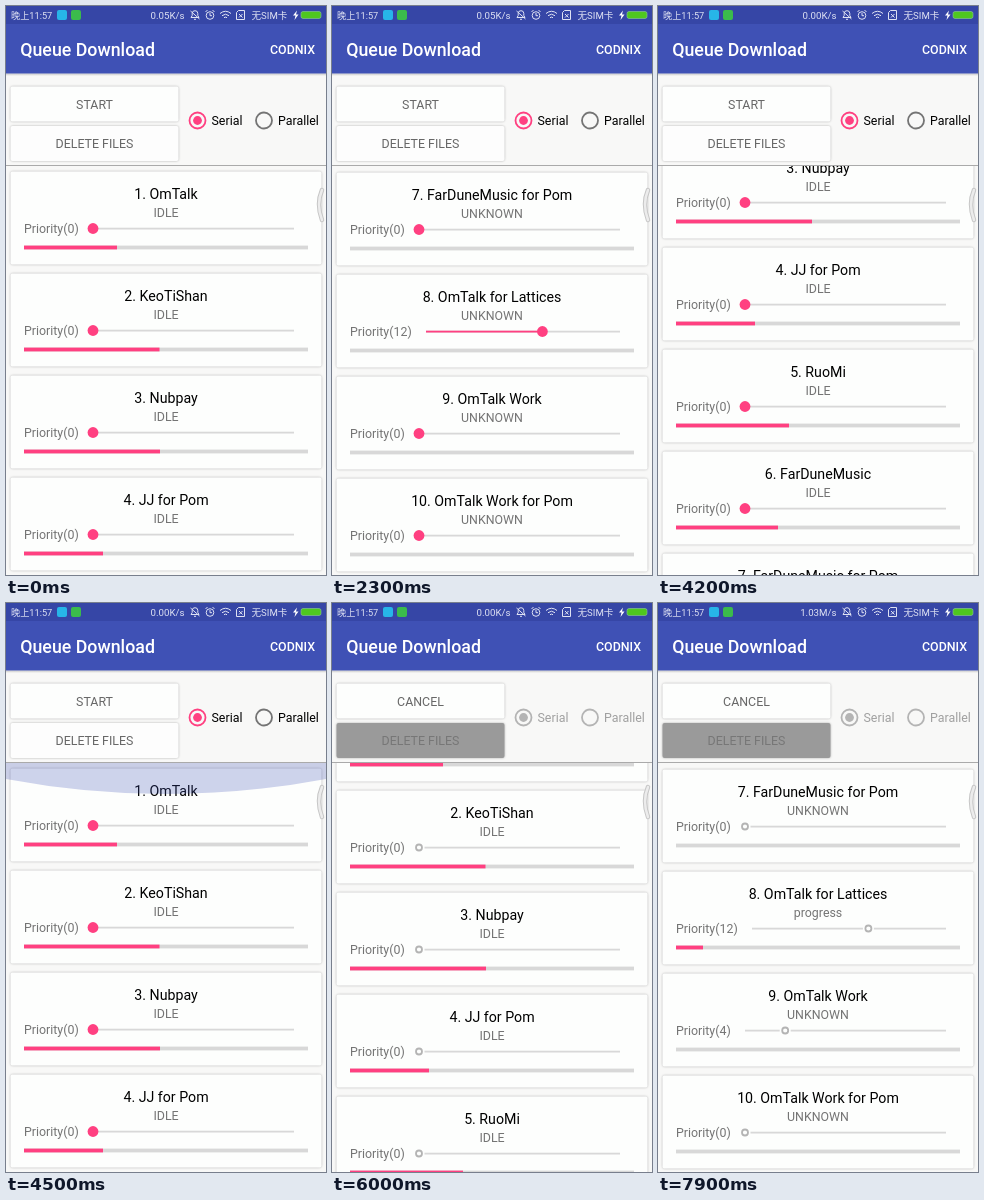
These frames come from a looping animation (320 px wide and 569 px high, 8 s). An HTML page:

```html
<!DOCTYPE html>
<html lang="en">
<head>
<meta charset="utf-8">
<title>Queue Download</title>
<style>
  html, body { margin: 0; width: 100%; height: 100%; overflow: hidden; background: #f8f8f7; }
  svg { display: block; width: 100vw; height: 100vh; font-family: Roboto, "Noto Sans CJK SC", "Noto Sans CJK", sans-serif; }
  .status { font-size: 9.2px; fill: #dfe2f3; }
  .label { font-size: 12.4px; }
  .name { font-size: 14.2px; }
  .raised { filter: drop-shadow(0 .7px .9px rgba(0, 0, 0, .28)); }
  .mid { text-anchor: middle; }
</style>
</head>
<body>
<svg viewBox="0 0 320 569">
  <defs>
    <clipPath id="listClip"><rect y="160" width="320" height="409"/></clipPath>
    <clipPath id="startClip"><rect x="4.5" y="80.5" width="168" height="35" rx="2"/></clipPath>
    <linearGradient id="barShadow" x2="0" y2="1">
      <stop stop-opacity=".2"/><stop offset="1" stop-opacity="0"/>
    </linearGradient>
  </defs>
  <rect width="320" height="569" fill="#f8f8f7"/>

  <g clip-path="url(#listClip)">
    <g id="list"></g>
    <path id="glow" fill="#3f51b5"/>
  </g>

  <rect y="67" width="320" height="92" fill="#f8f8f7"/>
  <rect y="159" width="320" height="1" fill="#aaa"/>
  <g id="controls"></g>

  <rect y="67.500" width="320" height="2.500" fill="url(#barShadow)"/>
  <rect width="320" height="67.500" fill="#3f51b5"/>
  <rect width="320" height="18" fill="#3646a6"/>
  <text x="14.200" y="49.700" font-size="17.800" font-weight="500" fill="#fff">Queue Download</text>
  <text x="309" y="47.500" class="label" font-weight="500" fill="#fff" text-anchor="end">CODNIX</text>

  <g class="status">
    <text x="5" y="13">晚上11:57</text>
    <text id="speed" x="178.500" y="13" font-size="9.700" text-anchor="end"></text>
    <text x="245.500" y="13" font-size="9.600">无SIM卡</text>
  </g>
  <rect x="51" y="4" width="10" height="10" rx="2" fill="#27b5e8"/>
  <rect x="65" y="4" width="10" height="10" rx="2" fill="#3bbb4c"/>
  <g fill="none" stroke="#dfe2f3" stroke-width="1">
    <path d="M185 11.5h8l-1.2-2v-2a2.8 2.8 0 0 0-5.6 0v2zM188 13.3h2M184.5 5l9 8"/>
    <circle cx="204" cy="9.5" r="3.8"/>
    <path d="M204 7v2.7h2M199.5 6l2-2M208.5 6l-2-2"/>
    <path d="M214 7.5q5.5-4.5 11 0M216 9.7q3.5-3 7 0M218 11.7q1.5-1.2 3 0"/>
    <path d="M230.5 13.5v-7l2-2h6v9zM233 8l3.5 3.5M236.5 8l-3.5 3.5"/>
  </g>
  <path d="M291 4.5l-4 5h2.5l-1 4.5 4-5.5h-2.5z" fill="#fff"/>
  <rect x="295" y="5.500" width="20" height="7" rx="2" fill="#4fc71f" stroke="#8fc79a" stroke-width=".6"/>

  <path d="M316 184q-6 14 0 30" fill="none" stroke="#c6c6c6" stroke-width="4.500" stroke-linecap="round"/>
  <path d="M316 184q-6 14 0 30" fill="none" stroke="#ececec" stroke-width="2.500" stroke-linecap="round"/>
</svg>
<script>
const LOOP = 8000, STEP = 100, ROW = 102, MAX_SCROLL = 611, STARTED = 5200;
const PINK = '#ff4081', TRACK = '#d8d8d8', GRAY = '#b4b4b4';
const BAR_LEFT = 18, BAR_RIGHT = 302;

// Title and right end of the stored progress bar
const tasks = [
  ['OmTalk', 111], ['KeoTiShan', 153.5], ['Nubpay', 154], ['JJ for Pom', 97], ['RuoMi', 131],
  ['FarDuneMusic', 120], ['FarDuneMusic for Pom'], ['OmTalk for Lattices'],
  ['OmTalk Work'], ['OmTalk Work for Pom']
];

const $ = id => document.getElementById(id);
const clamp = (v, lo = 0, hi = 1) => Math.min(hi, Math.max(lo, v));
const ramp = (t, from, to) => clamp((t - from) / (to - from));
const smooth = p => p * p * (3 - 2 * p);
const held = (t, keys) => keys.filter(k => k[0] <= t).pop()[1];

function tween(t, keys) {
  const i = keys.findIndex(k => k[0] > t);
  if (i < 0) return keys[keys.length - 1][1];
  if (i === 0) return keys[0][1];
  const [a, b] = [keys[i - 1], keys[i]];
  return a[1] + (b[1] - a[1]) * ramp(t, a[0], b[0]);
}

const scrollAt = t => tween(t, [
  [300, 0], [400, 130], [500, 430], [600, MAX_SCROLL],
  [3900, MAX_SCROLL], [4000, 550], [4200, 230], [4400, 0],
  [5900, 0], [6000, 80], [6200, 420], [6300, 545], [6400, MAX_SCROLL]
]);
const speedAt = t => held(t, [
  [0, '0.05K/s'], [3400, '0.00K/s'], [6500, '312K/s'], [7200, '0.87M/s'],
  [7500, '0.95M/s'], [7700, '0.98M/s'], [7900, '1.03M/s']
]);
const activeBar = t => held(t, [
  [0, 30], [6400, 35], [6900, 37], [7000, 38], [7200, 40], [7500, 41], [7700, 42], [7900, 45]
]);

function priorityAt(i, t) {
  if (i === 7) return Math.round(12 * smooth(ramp(t, 1500, 2150)));
  if (i === 8) return Math.round(4 * smooth(ramp(t, 3100, 3650)));
  return 0;
}

function pressAt(i, t) {
  const span = i === 7 ? [1400, 2300] : i === 8 ? [3000, 3800] : null;
  return span ? Math.min(ramp(t, span[0], span[0] + 200), 1 - ramp(t, span[1] - 200, span[1])) : 0;
}

const rect = (x, y, w, h, fill, extra = '') =>
  `<rect x="${x}" y="${y}" width="${w}" height="${h}" fill="${fill}" ${extra}/>`;
const text = (x, y, cls, fill, content) =>
  `<text x="${x}" y="${y}" class="${cls}" fill="${fill}">${content}</text>`;

function slider(value, press, disabled) {
  const left = value > 9 ? 94 : 87, x = left + (288 - left) * value / 20;
  const line = (from, to, color) => rect(from, 56.7, Math.max(0, to - from), 1.8, color);
  if (disabled) {
    return line(left, x - 5.5, TRACK) + line(x + 5.5, 288, TRACK) +
      `<circle cx="${x}" cy="57.5" r="3" fill="none" stroke="${GRAY}" stroke-width="1.8"/>`;
  }
  return line(left, 288, TRACK) + line(left, x, PINK) +
    `<circle cx="${x}" cy="57.5" r="${5.4 + 2.6 * press}" fill="${PINK}"/>`;
}

function card([title, stored], i, t, scroll) {
  const y = 165 + ROW * i - scroll;
  if (y > 569 || y < 60) return '';
  const running = t >= STARTED, active = running && i === 7;
  const status = active ? 'progress' : stored ? 'IDLE' : 'UNKNOWN';
  const end = active ? activeBar(t) : stored || BAR_LEFT;
  const value = priorityAt(i, t);
  return `<g transform="translate(0 ${y})">` +
    rect(4.5, 0.5, 311, 93, '#fdfefd', 'rx="2" class="raised"') +
    text(160, 28, 'name mid', '#000', `${i + 1}. ${title}`) +
    text(160, 45.6, 'label mid', '#747474', status) +
    text(18, 62.4, 'label', '#747474', `Priority(${value})`) +
    slider(value, pressAt(i, t), running) +
    rect(BAR_LEFT, 74.6, BAR_RIGHT - BAR_LEFT, 3.8, TRACK) +
    rect(BAR_LEFT, 74.6, end - BAR_LEFT, 3.8, PINK) + '</g>';
}

function radio(x, label, checked, disabled) {
  const color = disabled ? GRAY : checked ? PINK : '#747474';
  return `<circle cx="${x}" cy="114.5" r="8" fill="none" stroke="${color}" stroke-width="1.8"/>` +
    (checked ? `<circle cx="${x}" cy="114.5" r="4.4" fill="${color}"/>` : '') +
    text(x + 14, 119, 'label', disabled ? '#a0a0a0' : '#000', label);
}

function controls(t) {
  const running = t >= STARTED, dim = ramp(t, 5100, 5400);
  const spread = ramp(t, 4900, 5300), fade = 1 - ramp(t, 5200, 5700);
  const shade = Math.round(253 - 99 * dim);
  const ripple = spread > 0 && fade > 0
    ? `<circle cx="88" cy="98" r="${90 * spread}" fill="#000" opacity="${0.16 * fade}" clip-path="url(#startClip)"/>` : '';
  return rect(4.5, 80.5, 168, 35, '#fdfefd', 'rx="2" class="raised"') + ripple +
    text(88.5, 103.3, 'label mid', '#686868', running ? 'CANCEL' : 'START') +
    rect(4.5, 120, 168, 35, `rgb(${shade},${shade},${shade})`, 'rx="2" class="raised"') +
    text(88.5, 142.3, 'label mid', running ? '#777' : '#686868', 'DELETE FILES') +
    radio(191.5, 'Serial', true, running) + radio(258, 'Parallel', false, running);
}

function drawGlow(t) {
  const bottom = t > 6000, start = bottom ? 6300 : 4300;
  const k = Math.min(ramp(t, start, start + 200), 1 - ramp(t, start + 200, start + 500));
  const base = bottom ? 569 : 160, dir = bottom ? -1 : 1;
  const edge = base + dir * 16 * k, peak = base + dir * 46 * k;
  $('glow').setAttribute('d', `M0 ${base}V${edge}Q160 ${peak} 320 ${edge}V${base}Z`);
  $('glow').setAttribute('opacity', 0.25 * k);
}

function draw(t) {
  const scroll = scrollAt(t);
  $('list').innerHTML = tasks.map((task, i) => card(task, i, t, scroll)).join('');
  $('controls').innerHTML = controls(t);
  $('speed').textContent = speedAt(t);
  drawGlow(t);
}

let origin = null, shown = -1;
function tick(now) {
  origin ??= now;
  const t = Math.floor(((now - origin) % LOOP) / STEP) * STEP;
  if (t !== shown) draw(shown = t);
  requestAnimationFrame(tick);
}
draw(0);
requestAnimationFrame(tick);
</script>
</body>
</html>
```
